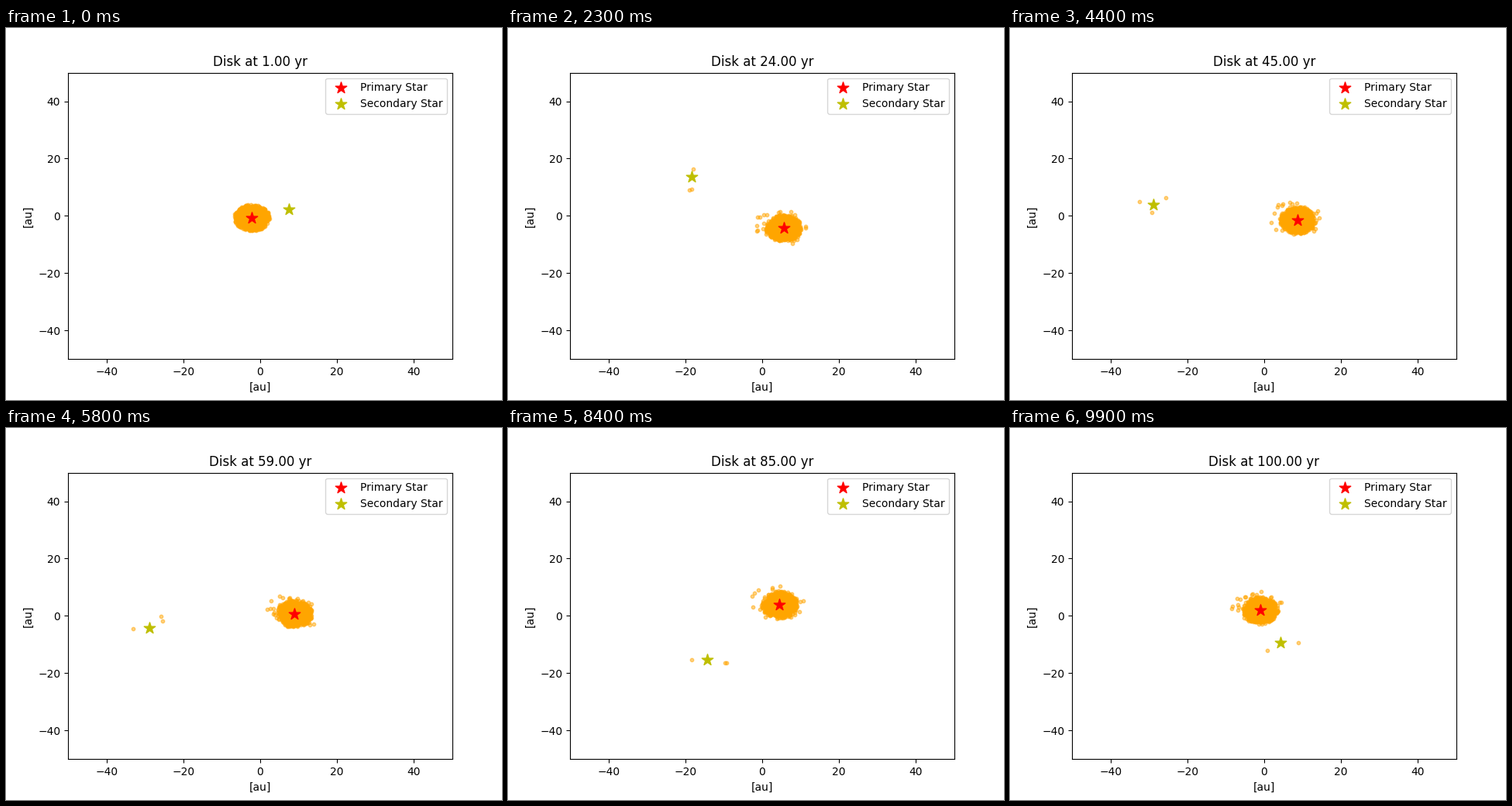
Write a matplotlib script that moves like this. It is 640 px wide and 480 px high and loops after 10000 ms.

```python
import numpy as np
import matplotlib.pyplot as plt
from matplotlib.animation import FuncAnimation

FRAMES = 100
INTERVAL = 100
TAU = 2 * np.pi
rng = np.random.default_rng(7)


def smooth(x):
    x = np.clip(x, 0, 1)
    return x * x * (3 - 2 * x)


def kepler(a, e, mean, peri=0.0):
    """Position on an ellipse around its focus, one row per body."""
    mean = np.mod(mean, TAU)
    ecc = mean + e * np.sin(mean)
    for _ in range(8):
        ecc = ecc - (ecc - e * np.sin(ecc) - mean) / (1 - e * np.cos(ecc))
    x = a * (np.cos(ecc) - e)
    y = a * np.sqrt(1 - e * e) * np.sin(ecc)
    c, s = np.cos(peri), np.sin(peri)
    return np.stack([x * c - y * s, x * s + y * c], axis=-1)


def stars(t):
    """Binary with mass ratio 0.3 and a slowly drifting barycentre."""
    sep = kepler(24.2, 0.592, TAU * t / 104.6)
    drift = np.array([0.002, -0.0065]) * t
    return drift - sep * 0.3 / 1.3, drift + sep / 1.3


class Ring:
    """Particles around the primary whose orbits are stirred up over time."""

    def __init__(self, a0, a1, ecc, apo, settle):
        self.a0, self.a1, self.ecc, self.settle = a0, a1, ecc, settle
        self.peri = apo + np.pi
        self.phase = rng.uniform(0, TAU, len(a0))

    def at(self, t):
        k = smooth(t / self.settle)
        a = self.a0 + (self.a1 - self.a0) * k
        mean = self.phase + TAU * t / self.a1 ** 1.5
        return kepler(a, self.ecc * k, mean - self.peri, self.peri)


def make_disk(n=1000):
    a = rng.uniform(0.3, 4.6, n)
    e = np.minimum(np.abs(rng.normal(0, 0.075, n)), 0.17) * (a / 4.6) ** 2
    return Ring(a, a, e, rng.uniform(0, TAU, n), 48)


def make_strays(n, a_range, e_range, apo, spread):
    a1 = rng.uniform(*a_range, n)
    e = rng.uniform(*e_range, n)
    direction = np.radians(rng.normal(apo, spread, n))
    return Ring(rng.uniform(3.6, 4.4, n), a1, e, direction, 24)


rings = [
    make_disk(),
    make_strays(18, (4.4, 5.5), (0.28, 0.58), 140, 22),
    make_strays(8, (4.6, 5.1), (0.18, 0.3), -8, 20),
]

LOOSE_T = [12, 24, 45, 52, 59, 71, 85, 100]
LOOSE_ANGLE = [-220, 78, 623, 723, 772, 1092, 1428, 1800]
LOOSE_R = [3, 2.86, 2.6, 6, 5.1, 7.4, 5.2, 0.4]


def captured(t):
    """Three particles that end up around the secondary."""
    inner = kepler(3.7, 0.25, 1.662 + TAU * (t - 85) / 13.1, np.radians(58))
    outer = kepler(3.93, 0.22, 3.591 + TAU * (t - 85) / 14.2, np.radians(150))
    angle = np.radians(np.interp(t, LOOSE_T, LOOSE_ANGLE))
    r = np.interp(t, LOOSE_T, LOOSE_R)
    loose = r * np.array([np.cos(angle), np.sin(angle)])
    return np.array([inner, outer, loose])


def particles(t):
    primary, secondary = stars(t)
    k = smooth((t - 3) / 9)
    centre = primary + (secondary - primary) * k
    bound = [primary + ring.at(t) for ring in rings]
    return np.vstack(bound + [centre + captured(t)])


fig, ax = plt.subplots(figsize=(6.4, 4.8), dpi=100)
ax.set(xlim=(-50, 50), ylim=(-50, 50), xlabel="[au]", ylabel="[au]")
dust = ax.scatter([], [], s=10, color="orange", alpha=0.5)
red = ax.scatter([0], [0], s=120, marker="*", color="r", label="Primary Star")
yellow = ax.scatter([0], [0], s=120, marker="*", color="y", label="Secondary Star")
ax.legend(loc="upper right")
title = ax.set_title("")


def update(i):
    t = i + 1.0
    primary, secondary = stars(t)
    dust.set_offsets(particles(t))
    red.set_offsets([primary])
    yellow.set_offsets([secondary])
    title.set_text(f"Disk at {t:.2f} yr")
    return dust, red, yellow, title


anim = FuncAnimation(fig, update, frames=FRAMES, interval=INTERVAL,
                     init_func=lambda: update(0), repeat=True, repeat_delay=0)
plt.show()
```
